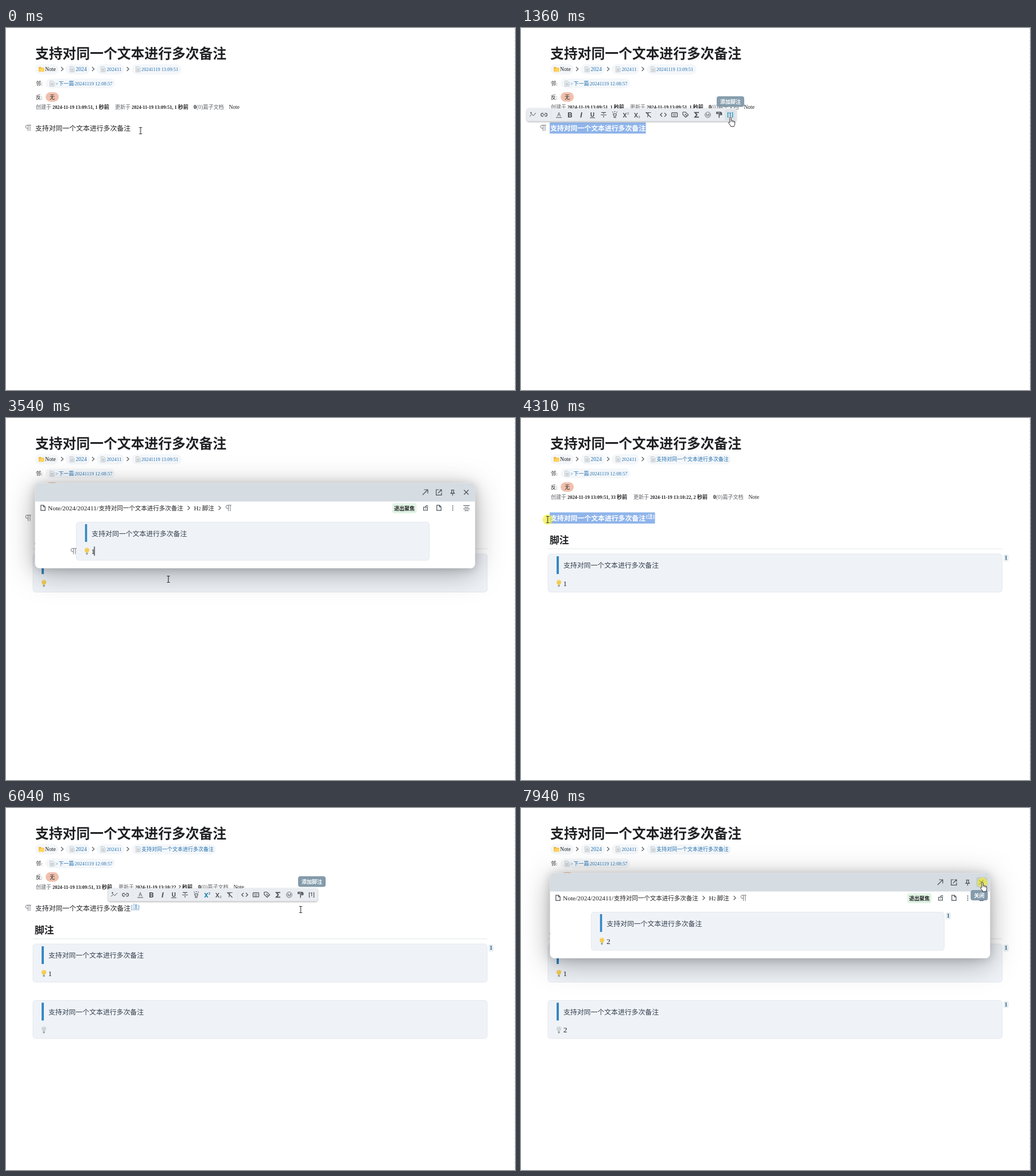
Animation of 887 by 631 pixels, one loop 8000 ms. Source, as an HTML page:

```html
<!DOCTYPE html>
<html lang="zh-CN">
<head>
<meta charset="utf-8">
<title>脚注</title>
<style>
html,body{margin:0;width:100%;height:100%;overflow:hidden;background:#fff}
svg{display:block;width:887px;height:631px}
text{font-family:'Liberation Serif','Noto Sans CJK SC',serif;fill:#202124;white-space:pre}
.s9{font-size:8.7px}.c9{font-size:9px}.b{font-weight:700}
.link text,.link{fill:#2470ae}
.gray{fill:#5f6368}
.body{font-size:11.87px;fill:var(--ink,#202124)}
.card{--ink:#343e4b}
.pill{fill:#f4f7fa}
.white{fill:#fff}
.ln{fill:none;stroke:#4b5057;stroke-width:1.2}
.ic text{font-family:Roboto,'Liberation Sans',sans-serif;fill:#4b5057;text-anchor:middle}
.ic .blue{fill:#1f8fc0}
.tip rect{fill:#839bab}.tip text{fill:#fff;font-size:9px;font-weight:700;text-anchor:middle}
.shade{fill:#fff;filter:drop-shadow(0 8px 25px rgba(0,0,0,.28)) drop-shadow(0 2px 8px rgba(0,0,0,.2))}
.lift{filter:drop-shadow(0 1px 1.5px rgba(0,0,0,.35))}

/* 1% = 80 ms */
.t{animation:8s step-end infinite}
@keyframes before{0%{opacity:1}52.125%{opacity:0}}
@keyframes after{0%{opacity:0}52.125%{opacity:1}}
@keyframes para{0%{opacity:1}1.75%{opacity:0}7.5%{opacity:1}47.75%{opacity:0}56.375%{opacity:1}80%{opacity:0}}
@keyframes sel1{0%{opacity:0}1.75%{opacity:1}24.25%{opacity:0}}
@keyframes sel2{0%{opacity:0}52.125%{opacity:1}73.6%{opacity:0}}
@keyframes note1{0%{opacity:0}24.25%{opacity:1}}
@keyframes note2{0%{opacity:0}73.6%{opacity:1}}
@keyframes caret{0%{opacity:0}24.25%{opacity:1}28%{opacity:0}}
@keyframes one{0%{opacity:0}48.75%{opacity:1}}
@keyframes two{0%{opacity:0}91.25%{opacity:1}}
@keyframes bar1{0%{opacity:0}8.4%{opacity:1}26.1%{opacity:0}}
@keyframes bar2{0%{opacity:0}57.25%{opacity:1}76.375%{opacity:0}}
@keyframes tip1{0%{opacity:0}16.1%{opacity:.97}26.1%{opacity:0}}
@keyframes tip2{0%{opacity:0}65.4%{opacity:1}76.375%{opacity:0}}
@keyframes hov1{0%{opacity:0}16.1%{opacity:1}25%{opacity:0}}
@keyframes hov2{0%{opacity:0}65.4%{opacity:1}73%{opacity:0}}
@keyframes pop{0%{opacity:0}28%{opacity:1}47.75%{opacity:0}77.25%{opacity:1}}
@keyframes edit{0%{opacity:0}30%{opacity:1}47.75%{opacity:0}79%{opacity:1}96%{opacity:0}}
@keyframes type1{0%{opacity:0}42.5%{opacity:1}47.75%{opacity:0}}
@keyframes type2{0%{opacity:0}89.4%{opacity:1}}
@keyframes pcaret{0%{transform:translateX(0)}42.5%{transform:translateX(3.5px)}50%{transform:translateX(0)}89.4%{transform:translateX(7px)}}
@keyframes close{0%{opacity:0}98.375%{opacity:1}}
@keyframes beam{0%{opacity:1}15.25%{opacity:0}24.25%{opacity:1}64.5%{opacity:0}73.6%{opacity:1}96.25%{opacity:0}}
@keyframes hand{0%{opacity:0}15.25%{opacity:1}24.25%{opacity:0}64.5%{opacity:1}73.6%{opacity:0}96.25%{opacity:1}}
@keyframes halo{0%{opacity:0}1.75%{opacity:1}7.5%{opacity:0}19.5%{opacity:1}21.5%{opacity:0}46.9%{opacity:1}48.75%{opacity:0}52.125%{opacity:1}56.375%{opacity:0}66.875%{opacity:1}68.875%{opacity:0}99.25%{opacity:1}}
.drag1{animation:drag1 8s linear infinite}
.drag2{animation:drag2 8s linear infinite}
@keyframes drag1{0%,1.75%{transform:translateX(168px)}4.25%,100%{transform:none}}
@keyframes drag2{0%,52.125%{transform:translateX(184px)}53.875%,100%{transform:none}}
.cur{animation:move 8s linear infinite}
@keyframes move{
0%,1.75%{transform:translate(234.5px,179px)}
4.25%,7.5%{transform:translate(45px,177px)}
12.5%{transform:translate(292px,174px)}
15%{transform:translate(350px,166px)}
16.25%,22.5%{transform:translate(365px,156px)}
26.1%,31.4%{transform:translate(360px,170px)}
36%{transform:translate(318px,230px)}
40.75%,44.5%{transform:translate(283px,281px)}
46.5%,49.5%{transform:translate(264px,352px)}
51.25%{transform:translate(250px,318px)}
52.125%{transform:translate(236px,178px)}
53.875%,56.375%{transform:translate(46.5px,177px)}
61%{transform:translate(330px,183px)}
64%{transform:translate(510px,170px)}
65.5%,71%{transform:translate(533px,156px)}
75.4%,77.25%{transform:translate(513.5px,177px)}
87.25%,89.5%{transform:translate(440px,226px)}
94%{transform:translate(650px,190px)}
97.5%,100%{transform:translate(804px,130px)}
}
</style>
</head>
<body>
<svg viewBox="0 0 887 631">
<defs>
  <text id="line" class="body">支持对同一个文本进行多次备注</text>
  <g id="doc">
    <path d="M1.5 .5h5.2L9 3v6.5H1.5z" fill="#f1f3f4" stroke="#b4bcc2" stroke-width=".8"/>
    <path d="M3 4h4.5M3 5.7h4.5M3 7.4h4.5" stroke="#9aa4ab" stroke-width=".7"/>
  </g>
  <path id="chev" d="M-2-3.5 1.6 0-2 3.5" fill="none" stroke="#5f6368" stroke-width="1.3"/>
  <path id="pil" d="M10.3-4.7H3.5a2.8 2.8 0 0 0 0 5.6H5M5-4.7V5.5M8.3-4.7V5.5" fill="none" stroke="#74797f"/>
  <g id="bulb">
    <circle cy="-1.8" r="4"/>
    <path d="M-2.2 0h4.4l-.7 3.6h-3z"/>
    <path d="M-1.6 3h3.2v2.4l-.8.8h-1.6l-.8-.8z" fill="#9aa3a8"/>
    <path d="M-1.8-3.8q.8-.9 1.8-.8" stroke="#fff" stroke-width=".8" fill="none"/>
  </g>
  <g id="badge">
    <rect x="-4.3" y="-6" width="8.6" height="12" rx="2" fill="#e6edf1"/>
    <text y="3.3" class="b" text-anchor="middle" font-size="10" style="fill:#2f5f7e">1</text>
  </g>
  <path id="page" class="ln" d="M-3.7-4.5h4.6l2.8 2.8v6.2h-7.4zM.9-4.5v2.8h2.8"/>
  <g id="bar" class="ic">
    <rect class="lift" x="10" y="140" width="365" height="22.5" rx="4" fill="#e9edf1"/>
    <path d="M53 144v14M235 144v14" stroke="#e1e5e9"/>
    <g class="ln">
      <path d="M15 154.3l4-4 2.6 2.5 4.3-4.8M17.5 146.5v3M16 148h3" stroke-width="1"/>
      <path d="M39 148.6h-1.6a2.6 2.6 0 0 0 0 5.2H39M41.5 148.6h1.4a2.6 2.6 0 0 1 0 5.2h-1.4M38 151.2h4.5"/>
      <path d="M61 156h10M120 156.5h9M139 151.5h10M140 147.3h8M144 147.3v2.5M144 153v3"/>
      <path d="M161 149.5h5v2.3l-1.2 1.2v3h-2.6v-3l-1.2-1.2zM163.5 145v2M159.5 146l1.2 1.3M167.5 146l-1.2 1.3"/>
      <path d="M218 147.5h8.5M222 147.5l-1.5 8M217.5 147l9 9"/>
      <path d="M246 148l-3.3 3.2 3.3 3.3M250 148l3.3 3.2-3.3 3.3"/>
      <rect x="262.5" y="147.7" width="10" height="7.2" rx="1"/>
      <path d="M264.5 150h6M264.5 151.7h6M265.5 153.3h4" stroke-width=".9" stroke-dasharray="1.2 .6"/>
      <path d="M282 147v3.7l5 5 4.6-4.3-5-4.9h-4zM285.5 149.8l3.5 3.3"/>
      <path d="M310 147.3h-7l3.6 4-3.6 4h7" stroke-width="1.8"/>
      <circle cx="325.5" cy="151.3" r="4.8" stroke-width=".8"/>
      <path d="M341 146.7h7v2.6h-7zM348 148h1.6v3.3h-4.3v1.8M345.3 153v3.5" stroke-width="1.5"/>
    </g>
    <text x="66" y="153.7" font-size="9.5">A</text>
    <text x="85.3" y="155.8" font-size="13.5" class="b">B</text>
    <text x="105" y="155.8" font-size="13.5" class="b" font-style="italic">I</text>
    <text x="124.3" y="154.5" font-size="11" class="b">U</text>
    <text x="181" y="156" font-size="11.5" font-weight="500">X</text><text x="186.5" y="151" font-size="6">2</text>
    <text x="200.5" y="156" font-size="11.5" font-weight="500">X</text><text x="206" y="157" font-size="6">2</text>
    <text x="325.5" y="154" font-size="7.5">M</text>
    <text x="364.5" y="154.3" font-size="9.5" font-weight="500">[1]</text>
  </g>
  <g id="hot" class="ic">
    <rect x="355" y="142" width="19" height="19" rx="3" fill="#dce2e7"/>
    <text x="364.5" y="154.3" font-size="9.5" class="b blue">[1]</text>
  </g>
  <g id="tip" class="tip">
    <rect x="341" y="119" width="48" height="18.5" rx="4"/>
    <text x="365" y="131.7">添加脚注</text>
  </g>
  <g id="card" class="card">
    <rect x="47" y="237" width="791.5" height="66.5" rx="4.5" fill="#eff3f8" stroke="#e3e8ee"/>
    <rect x="62" y="241" width="4" height="31" fill="#3788c4"/>
    <use href="#line" x="74" y="261.3"/>
  </g>
  <clipPath id="c1"><rect class="drag1" x="50" y="160" width="168" height="30"/></clipPath>
  <clipPath id="c2"><rect class="drag2" x="50" y="160" width="184" height="30"/></clipPath>
</defs>

<path d="M886.5 0V631" stroke="#e2e4e6" stroke-dasharray="4 3"/>
<text x="51" y="53" font-size="23.8" class="b">支持对同一个文本进行多次备注</text>

<!-- breadcrumb -->
<g class="pill">
  <rect x="51" y="63" width="41" height="18" rx="9"/>
  <rect x="104" y="63" width="42" height="18" rx="9"/>
  <rect x="158" y="63" width="48" height="18" rx="9"/>
  <rect x="69" y="88" width="121" height="17" rx="8.5"/>
</g>
<path d="M57 68h4l1 1.5h4.5V76H57z" fill="#f2b632"/>
<path d="M58.5 70.5H67L66 76.5h-8.7z" fill="#ffd45e"/>
<text x="68" y="75" font-size="9.7">Note</text>
<use href="#chev" x="98" y="71.5"/><use href="#chev" x="152" y="71.5"/><use href="#chev" x="212.5" y="71.5"/>
<use href="#doc" x="110" y="67"/><use href="#doc" x="164" y="67"/><use href="#doc" x="75" y="92"/>
<g class="link s9">
  <text x="121.5" y="75" font-size="9.6">2024</text>
  <text x="175.5" y="75">202411</text>
  <text x="86" y="100">&gt;</text><text x="91.5" y="100" class="c9">下一篇</text>
  <text x="117.5" y="100">·</text><text x="119.8" y="100" font-size="8.5">20241119 12:08:57</text>
</g>
<text x="52" y="100.3" class="c9">邻:</text>
<text x="52" y="123.5" class="c9">反:</text>
<rect x="69" y="112" width="23" height="16.5" rx="8.2" fill="#f0c0ad"/>
<text x="76" y="123.5" class="c9">无</text>

<g class="t" style="animation-name:before">
  <rect class="pill" x="219" y="63" width="87" height="18" rx="9"/>
  <use href="#doc" x="225" y="67"/>
  <text x="236" y="75" font-size="8.3" class="link">20241119 13:09:51</text>
  <g font-size="8.25">
    <text x="52" y="140.5" class="gray c9">创建于</text>
    <text x="81" y="140.5" class="b">2024-11-19 13:09:51, 1 <tspan class="c9">秒前</tspan></text>
    <text x="190" y="140.5" class="gray c9">更新于</text>
    <text x="219" y="140.5" class="b">2024-11-19 13:09:51, 1 <tspan class="c9">秒前</tspan></text>
    <text x="327" y="140.5" class="b" font-size="9.5">0</text>
    <text x="331.8" y="140.5" class="gray" font-size="9.8">(0)<tspan class="c9" x="343.5">篇子文档</tspan></text>
    <text x="388.5" y="140.5" font-size="9.5">Note</text>
  </g>
</g>
<g class="t" style="animation-name:after">
  <rect class="pill" x="219" y="63" width="147" height="18" rx="9"/>
  <use href="#doc" x="225" y="67"/>
  <text x="236" y="75.2" class="c9 link">支持对同一个文本进行多次备注</text>
  <g font-size="8.4">
    <text x="52" y="140.5" class="gray c9">创建于</text>
    <text x="81" y="140.5" class="b">2024-11-19 13:09:51, 33 <tspan class="c9">秒前</tspan></text>
    <text x="196" y="140.5" class="gray c9">更新于</text>
    <text x="225" y="140.5" class="b">2024-11-19 13:10:22, 2 <tspan class="c9">秒前</tspan></text>
    <text x="335" y="140.5" class="b" font-size="9.5">0</text>
    <text x="339.8" y="140.5" class="gray" font-size="9.8">(0)<tspan class="c9" x="351.5">篇子文档</tspan></text>
    <text x="396.5" y="140.5" font-size="9.5">Note</text>
  </g>
</g>

<!-- paragraph -->
<g class="t" style="animation-name:para"><use href="#pil" x="33.5" y="174"/></g>
<use href="#line" x="51" y="178.7"/>
<g class="t" style="animation-name:note1">
  <text x="218" y="174.5" font-size="8.8" class="link">[注]</text>
  <path d="M218 177.5h15" stroke="#2470ae" stroke-width=".8" stroke-dasharray="2 1"/>
  <text x="50" y="218.5" font-size="16.8" class="b">脚注</text>
  <path d="M47 228h791.5" stroke="#e2e5e8"/>
  <use href="#card"/>
  <use href="#bulb" x="66" y="288" fill="#f3cc52"/>
</g>
<g class="t" style="animation-name:sel1"><g clip-path="url(#c1)">
  <rect x="50" y="164.5" width="167.5" height="19.5" fill="#8fb4ea"/>
  <text x="51" y="178.7" class="body b white">支持对同一个文本进行多次备注</text>
</g></g>
<g class="t" style="animation-name:sel2"><g clip-path="url(#c2)">
  <rect x="50" y="164.5" width="183.5" height="19.5" fill="#8fb4ea"/>
  <text x="51" y="178.7" class="body b white">支持对同一个文本进行多次备注</text>
  <text x="218" y="174.5" font-size="8.8" class="b white">[注]</text>
</g></g>
<path class="t" style="animation-name:caret" d="M217.7 166v16" stroke="#111" stroke-width="1.2"/>
<g class="t" style="animation-name:one">
  <text x="73.5" y="292.7" font-size="13">1</text>
  <use href="#badge" x="845.3" y="244"/>
</g>
<g class="t" style="animation-name:note2">
  <use href="#card" y="98.4"/>
  <use href="#bulb" x="66" y="386.5" fill="#cdd6da"/>
</g>
<g class="t" style="animation-name:two">
  <text x="73.8" y="391.2" font-size="13.5">2</text>
  <use href="#badge" x="845.3" y="342.5"/>
</g>

<!-- floating toolbar -->
<g class="t" style="animation-name:bar1">
  <use href="#bar"/>
  <g class="t" style="animation-name:hov1"><use href="#hot"/></g>
  <g class="t" style="animation-name:tip1"><use href="#tip"/></g>
</g>
<g class="t" style="animation-name:bar2" transform="translate(168)">
  <use href="#bar"/>
  <g class="ic">
    <text x="181" y="156" font-size="11.5" font-weight="500" class="blue">X</text>
    <text x="186.5" y="151" font-size="6" class="blue">2</text>
  </g>
  <g class="t" style="animation-name:hov2"><use href="#hot"/></g>
  <g class="t" style="animation-name:tip2"><use href="#tip"/></g>
</g>

<!-- popup -->
<g class="t" style="animation-name:pop">
  <rect class="shade" x="50.5" y="113.5" width="767" height="148.5" rx="8"/>
  <path d="M50.5 145.5v-24a8 8 0 0 1 8-8h751a8 8 0 0 1 8 8v24z" fill="#d5dce2"/>
  <rect class="t" style="animation-name:close" x="793.5" y="120.5" width="19" height="18" rx="4" fill="#c3cad0"/>
  <g class="ln">
    <path d="M726 134l9-9M728.5 125h6.5v6.5"/>
    <path d="M754 125h-4.3v9.3h9.3V130M755.5 125h3.5v3.5M759 125l-6 6"/>
    <path d="M775.5 125.5h5.5M776.7 125.5v4l-1.5 1.8h6.2l-1.5-1.8v-4M778.3 131.3v4"/>
    <path d="M798 125.5l8 8M806 125.5l-8 8"/>
    <path d="M727.7 155.5h6.6v5.5h-6.6zM731.5 155.5v-1.3a1.7 1.7 0 0 1 3.4 0M731 157.5v1.5"/>
    <path d="M797 152.5h11M799 155.5h7M797 158.5h11M799 161.5h7"/>
  </g>
  <g fill="#4b5057"><circle cx="778.5" cy="153.5" r="1"/><circle cx="778.5" cy="157" r="1"/><circle cx="778.5" cy="160.5" r="1"/></g>
  <use href="#page" x="64.5" y="156.7"/><use href="#page" x="754.5" y="156.7"/>
  <text x="73" y="160.7" font-size="11.4">Note/2024/202411/<tspan x="161.8" font-size="10.5">支持对同一个文本进行多次备注</tspan></text>
  <use href="#chev" x="318.5" y="156.7"/><use href="#chev" x="372.5" y="156.7"/>
  <text x="327.5" y="160.7" font-size="11">H<tspan font-size="8">2</tspan><tspan x="341.8" font-size="10.5">脚注</tspan></text>
  <use href="#pil" x="382.5" y="156.7"/>
  <rect x="673" y="148.5" width="42.5" height="17.5" rx="4" fill="#e2f4e5"/>
  <text x="676.3" y="160.5" class="c9 b">退出聚焦</text>
  <g class="card">
    <rect x="122.5" y="181.5" width="615" height="66.5" rx="4.5" fill="#eff3f8" stroke="#e3e8ee"/>
    <rect x="137.7" y="185" width="3.6" height="31" fill="#3788c4"/>
    <use href="#line" x="149.3" y="205.5"/>
  </g>
  <use href="#bulb" x="141" y="232" fill="#f3cc52"/>
  <g class="t" style="animation-name:edit">
    <use href="#pil" x="112.5" y="232"/>
    <path class="t" style="animation-name:pcaret" d="M150.5 224v16" stroke="#111" stroke-width="1.1"/>
  </g>
  <text class="t" style="animation-name:type1" x="148.5" y="236.7" font-size="13">1</text>
  <text class="t" style="animation-name:type2" x="149" y="236.7" font-size="13.5">2</text>
  <g class="t" style="animation-name:two"><use href="#badge" x="744.5" y="188"/></g>
  <g class="t tip" style="animation-name:close">
    <rect x="783.5" y="143" width="30" height="18" rx="4"/>
    <text x="798.5" y="155.5">关闭</text>
  </g>
</g>

<!-- pointer -->
<g class="cur">
  <circle class="t" style="animation-name:halo" r="9" fill="#f0ee2e" fill-opacity=".65"/>
  <path class="t" style="animation-name:beam" d="M-2.5-5.5H-.7L0-5 .7-5.5H2.5M0-5V5M-2.5 5.5H-.7L0 5 .7 5.5H2.5" fill="none" stroke="#222" stroke-width="1.1"/>
  <g class="t" style="animation-name:hand">
    <path d="M-1.2.5q0-1.2 1.2-1.2t1.2 1.2v4.5q2.2-.6 2.4.8 2-.4 2.2.9 1.9-.2 1.9 1.3v3.5q0 1.6-1.3 2.8v1.5h-6v-1.3l-3.3-4.5q-.9-1.5.3-1.9 1-.2 1.4.8z" fill="#fff" stroke="#222" stroke-width=".9" stroke-linejoin="round"/>
    <path d="M1.2 5v3M3.6 5.8v2.5M5.8 6.7v2" stroke="#222" stroke-width=".7"/>
  </g>
</g>
</svg>
</body>
</html>
```
